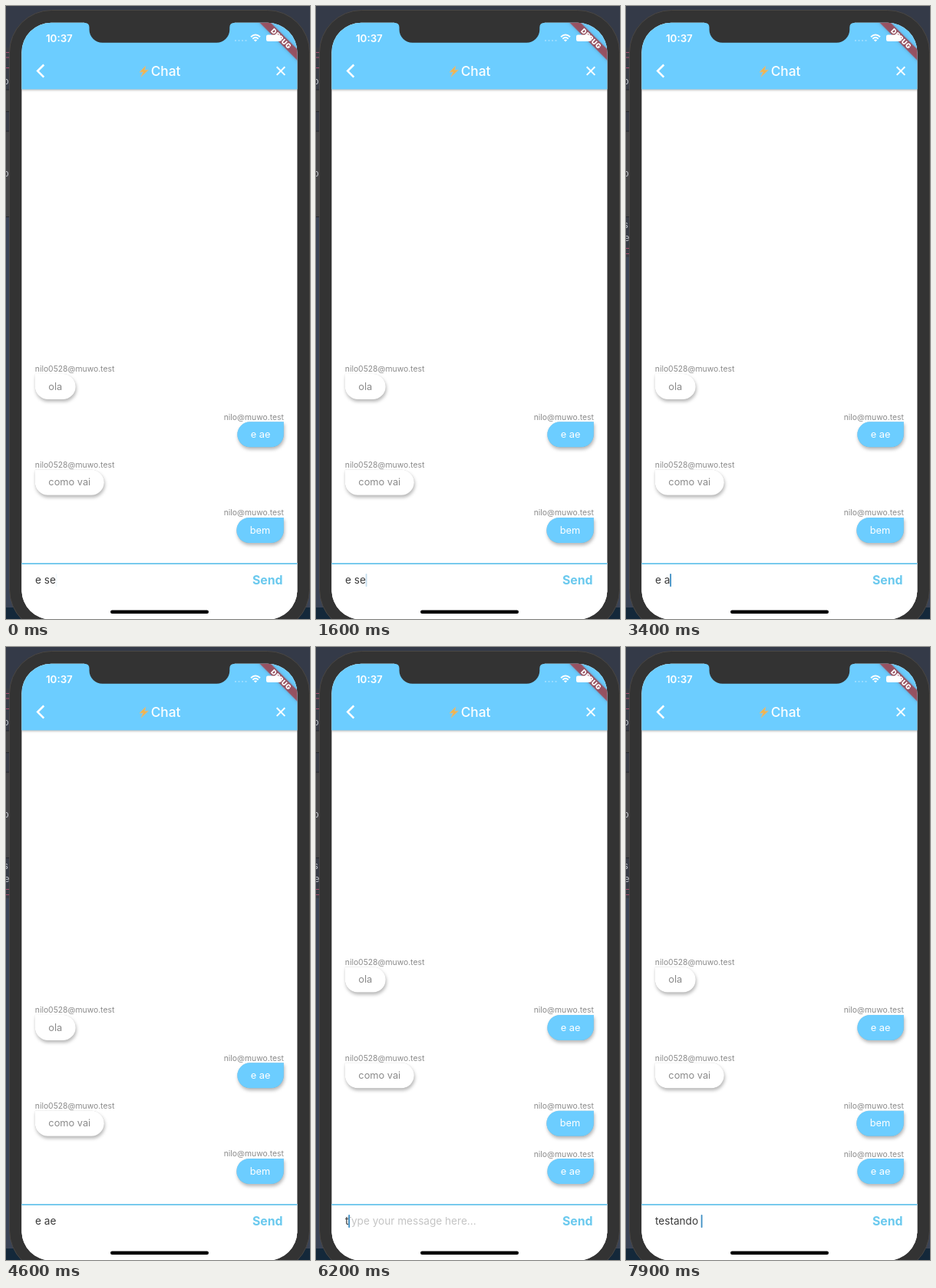
Write an HTML page that moves like this. It is 396 px wide and 798 px high and loops after 8000 ms.

```html
<!DOCTYPE html>
<html lang="pt">
<head>
<meta charset="utf-8">
<title>Chat</title>
<style>
  html, body { margin: 0; width: 100%; height: 100%; overflow: hidden; background: #333946; }
  svg { display: block; width: 396px; height: 798px; font-family: Inter, Roboto, sans-serif; }
  text { white-space: pre; }
  .line { fill: none; stroke: #fff; }
  .label { font-size: 10.35px; fill: #8b8b8b; }
  .words { font-size: 12.8px; text-anchor: middle; }
  .field { font-size: 13.6px; }
  .code { font-size: 11px; fill: #c9ccd2; }
  .bubble { filter: drop-shadow(0 0 .6px rgba(0,0,0,.2)) drop-shadow(1.5px 3.5px 2px rgba(0,0,0,.28)); }
  .bar { filter: drop-shadow(0 1px 1.5px rgba(0,0,0,.3)); }
</style>
</head>
<body>
<svg viewBox="0 0 396 798">
  <defs>
    <clipPath id="screen"><rect x="20.400" y="21.700" width="359" height="777" rx="38.500"/></clipPath>
  </defs>

  <!-- editor window behind the phone -->
  <rect width="396" height="798" fill="#3a4355"/>
  <rect width="396" height="54" fill="#343a48"/>
  <rect y="783" width="396" height="15" fill="#14283a"/>
  <rect y="54" width="8" height="221" fill="#383c46"/>
  <rect y="109" width="8" height="28" fill="#444"/>
  <rect y="163" width="8" height="111" fill="#454547"/>
  <path d="M0 109H8M0 137.500H8M0 163H8M0 274.500H8" stroke="#25272c"/>
  <path d="M0 60.500H5M0 67H5M0 80.500H5" stroke="#a34e6c"/>
  <text class="code" x="-3" y="102">o</text>
  <text class="code" x="-3" y="222">o</text>
  <g id="log">
    <rect y="275" width="8" height="52" fill="#383c46"/>
    <text class="code" x="-3" y="289">s</text>
    <text class="code" x="-2" y="306">e</text>
    <path d="M0 315.500H5M0 322.500H5" stroke="#a34e6c"/>
  </g>

  <rect x="4.500" y="5.500" width="391" height="809" rx="55" fill="#333" stroke="#4a4744"/>

  <g clip-path="url(#screen)">
    <rect x="20" y="21" width="360" height="778" fill="#fff"/>
    <g id="messages"></g>

    <rect class="bar" x="20" y="10" width="360" height="98.400" fill="#6ccdff"/>
    <g transform="translate(358.500 42.600) rotate(45)">
      <rect x="-40" y="-5.200" width="80" height="10.400" fill="#b71c1c" fill-opacity=".63"
            style="filter:drop-shadow(0 0 2.500px rgba(0,0,0,.25))"/>
      <text y="3.200" font-size="8.840" font-weight="900" letter-spacing=".5" fill="#fff" text-anchor="middle">DEBUG</text>
    </g>

    <text x="52" y="46.800" font-size="13.300" font-weight="600" fill="#fff">10:37</text>
    <path d="M298 45H314" stroke="#fff" stroke-width="2" stroke-dasharray="2 2.500" opacity=".3"/>
    <path class="line" stroke-width="1.900" d="M319 40.200Q325 34.800 331 40.200M321.300 42.700Q325 39.300 328.700 42.700"/>
    <path d="M325 46.500L322.800 44.300Q325 42.600 327.200 44.300Z" fill="#fff"/>
    <rect x="339" y="37.500" width="19" height="8.500" rx="2.200" fill="#fff"/>
    <rect x="359" y="40" width="1.500" height="3.500" rx=".7" fill="#fff"/>

    <path class="line" stroke-width="2.600" d="M49.300 76.500L41.200 84.600L49.300 92.700"/>
    <path class="line" stroke-width="2" d="M352.700 79.300L363.300 89.900M363.300 79.300L352.700 89.900"/>
    <path d="M181.800 78L174 86H178.600L176 92.300L185.400 83.300H180.700Z" fill="#f2b54b" stroke="#c9bd9c"/>
    <text x="188.700" y="91" font-size="17.300" font-weight="500" fill="#fff">Chat</text>

    <rect x="20" y="725" width="360" height="74" fill="#fff"/>
    <rect x="20" y="725" width="360" height="1.800" fill="#6bc5ec"/>
    <rect id="press" x="303" y="731.500" width="78" height="31.500" rx="2" fill="#e0e0e0"/>
    <text x="321" y="753.200" font-size="15.800" font-weight="700" fill="#6ac9ee">Send</text>
    <text id="hint" class="field" x="38" y="752.300" fill="#8a8a8a">Type your message here...</text>
    <text id="typed" class="field" x="38" y="752.300" fill="#3a3a3a"></text>
    <rect id="caret" y="739" width="1.800" height="17" rx=".8" fill="#3f8fc4"/>
    <rect x="136" y="786.500" width="128" height="4.400" rx="2.200"/>
  </g>

  <path fill="#333" d="M102 20V21.700Q108.500 21.700 108.500 28V30.800a17 17 0 0 0 17 17H274.300a17 17 0 0 0 17 -17V28Q291.300 21.700 297.800 21.700V20Z"/>
</svg>

<script>
const $ = id => document.getElementById(id);
const clamp = x => Math.min(1, Math.max(0, x));
const easeOut = x => 1 - (1 - clamp(x)) ** 2;

const LOOP = 8000, STEP = 100;
const SENT = 5250, DELIVERED = 5300, LOGGED = 2800;
const LEFT = 37.8, RIGHT = 361.8, TOP = 416.6, ROW = 62.35, RADIUS = 16.5;

// [text, bubble width, sent by me (1) or received (0)]
const chat = [
  ['ola', 53, 0], ['e ae', 60.5, 1], ['como vai', 90, 0], ['bem', 61.5, 1], ['e ae', 60.5, 1]
];

// [time, content of the input field]
const edits = [
  [-2010, 'e se'], [1800, 'e s'], [1950, 'e '], [2100, 'e'], [2250, ''],
  [2900, 'e'], [3100, 'e '], [3400, 'e a'], [3600, 'e ae'], [SENT, ''],
  ...[6100, 6350, 6550, 6750, 6950, 7150, 7350, 7550, 7700]
    .map((time, i) => [time, 'testando '.slice(0, i + 1)])
];

const bubbleX = ([, width, mine]) => mine ? RIGHT - width : LEFT;

function message(item, i) {
  const [words, width, mine] = item, y = TOP + ROW * i;
  return `<g>
    <text class="label" x="${mine ? RIGHT : LEFT}" y="${y - 2.5}" text-anchor="${mine ? 'end' : 'start'}">${mine ? 'nilo' : 'nilo0528'}@muwo.test</text>
    <path class="bubble" fill="${mine ? '#6ccdff' : '#fff'}"/>
    <text class="words" x="${bubbleX(item) + width / 2}" y="${y + 20.8}" fill="${mine ? '#fff' : '#8a8a8a'}">${words}</text>
  </g>`;
}
$('messages').innerHTML = chat.map(message).join('');
const newest = $('messages').lastElementChild;
const bubbles = document.querySelectorAll('.bubble');

// side 0 squares the top left corner, side 1 the top right one
function bubblePath(item, i, side) {
  const r = RADIUS, tl = r * side, tr = r - tl, x = bubbleX(item), y = TOP + ROW * i;
  const arc = (radius, dx, dy) => `a${radius} ${radius} 0 0 1 ${dx} ${dy}`;
  return `M${x + tl} ${y}H${x + item[1] - tr}${arc(tr, tr, tr)}V${y + r}${arc(r, -r, r)}`
    + `H${x + r}${arc(r, -r, -r)}V${y + tl}${arc(tl, tl, -tl)}Z`;
}

function hintOpacity(t, k) {
  const [time, text] = edits[k], fade = clamp((t - time) / 200);
  if (!text) return fade;
  return k && !edits[k - 1][1] ? 1 - fade : 0;
}

// Solid after an edit, then fading out and in every half second
function caretOpacity(age) {
  const phase = age % 1000;
  if (phase >= 500) return 1 - easeOut((phase - 500) / 250);
  return age < 500 ? 1 : easeOut(phase / 250);
}

function drawMessages(t) {
  const delivered = t >= DELIVERED;
  newest.style.opacity = +delivered;
  $('messages').setAttribute('transform', `translate(0 ${delivered ? 0 : ROW})`);
  // Each row morphs from the shape of the bubble it held before
  const morph = delivered ? clamp((t - DELIVERED) / 200) : 1;
  chat.forEach((item, i) => {
    const before = i ? chat[i - 1][2] : item[2];
    bubbles[i].setAttribute('d', bubblePath(item, i, before + (item[2] - before) * morph));
  });
}

function draw(t) {
  const k = edits.findLastIndex(([time]) => time <= t);
  const [time, text] = edits[k];
  $('typed').textContent = text;
  $('hint').style.opacity = hintOpacity(t, k);
  $('caret').setAttribute('x', 37.8 + (text ? $('typed').getComputedTextLength() : 0));
  $('caret').style.opacity = caretOpacity(t - time);
  $('press').style.opacity = clamp((t - 5050) / 150) * clamp((5600 - t) / 250);
  $('log').style.opacity = +(t >= LOGGED);
  drawMessages(t);
}

function tick() {
  draw(Math.floor(performance.now() % LOOP / STEP) * STEP);
  requestAnimationFrame(tick);
}
tick();
</script>
</body>
</html>
```
